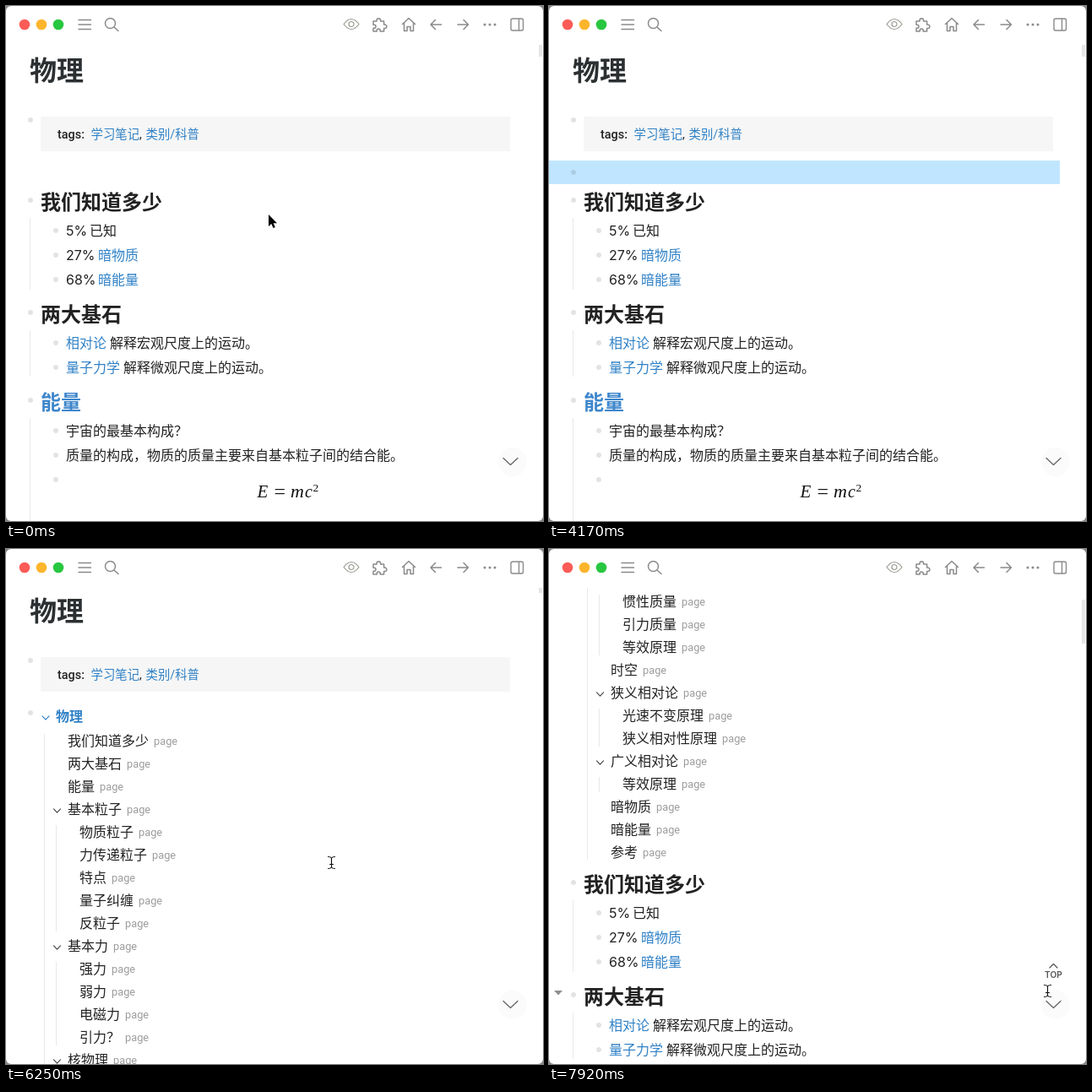
Write an HTML page with a canvas that moves like this. It is 636x610 px and loops after 8000 ms.

```html
<!DOCTYPE html>
<html lang="zh-CN">
<head>
<meta charset="utf-8">
<title>物理</title>
<style>
html, body { margin: 0; width: 100%; height: 100%; overflow: hidden; background: #fff; }
canvas { display: block; }
</style>
</head>
<body>
<canvas id="stage" width="636" height="610"></canvas>
<script>
const ctx = document.getElementById('stage').getContext('2d');
const LOOP = 8000, TICK = 1000 / 12;
const SANS = 'Roboto, "Noto Sans CJK SC", "Noto Sans CJK", sans-serif';
const WIDE = 'Inter, "Noto Sans CJK SC", sans-serif';
const INK = '#222', LINK = '#2f81c6', RULE = '#e8e8e8', ICON = '#8a8a8a';
const BAR = 46, TOC_SHIFT = 873;

// level, label, has children
const toc = [
  [1, '我们知道多少'], [1, '两大基石'], [1, '能量'],
  [1, '基本粒子', 1], [2, '物质粒子'], [2, '力传递粒子'], [2, '特点'], [2, '量子纠缠'], [2, '反粒子'],
  [1, '基本力', 1], [2, '强力'], [2, '弱力'], [2, '电磁力'], [2, '引力？'],
  [1, '核物理', 1], [2, '核辐射'], [2, '核反应', 1], [3, '核裂变'], [3, '核聚变'],
  [1, '质量', 1], [2, '惯性质量'], [2, '引力质量'], [2, '等效原理'], [1, '时空'],
  [1, '狭义相对论', 1], [2, '光速不变原理'], [2, '狭义相对性原理'],
  [1, '广义相对论', 1], [2, '等效原理'], [1, '暗物质'], [1, '暗能量'], [1, '参考']
];

const commands = ['Page reference', 'Page embed', 'Block reference', 'Block embed', 'Link',
  'Image link', 'Underline', 'Code block', 'Today', 'Tomorrow', 'Yesterday'];
const matches = ['Table of Contents', 'Query table function', 'Time stamp', 'Today', 'Template',
  'Tomorrow', 'Current time', 'Date picker', 'Calculator', 'Create table', 'Draw'];
const matchCounts = [11, 6, 3, 2, 2];

// keyed by time in ms
const scrollKeys = [[6170, 0], [6250, 3], [6330, 3], [6420, 72], [6580, 193], [6750, 290], [6920, 371],
  [7170, 478], [7420, 585], [7580, 650], [7670, 690], [7750, 708]];
const pathIn = [[0, 310, 246], [80, 301, 243], [250, 235, 221], [420, 180, 206], [500, 174, 205]];
const pathOut = [[5330, 150, 194], [5580, 150, 193], [5750, 106, 167], [5830, 190, 222], [5920, 320, 325],
  [6000, 385, 371], [7580, 385, 371], [7750, 500, 455], [7840, 575, 512], [7920, 590, 523]];

function track(keys, t) {
  if (t <= keys[0][0]) return keys[0].slice(1);
  const i = keys.findIndex(k => k[0] >= t);
  if (i < 0) return keys[keys.length - 1].slice(1);
  const a = keys[i - 1], b = keys[i], u = (t - a[0]) / (b[0] - a[0]);
  return a.slice(1).map((v, j) => v + (b[j + 1] - v) * u);
}

function rect(x, y, w, h, color) {
  ctx.fillStyle = color;
  ctx.fillRect(x, y, w, h);
}
function dot(x, y, r, color) {
  ctx.fillStyle = color;
  ctx.beginPath();
  ctx.arc(x, y, r, 0, 7);
  ctx.fill();
}
function stroke(d, color, width) {
  ctx.strokeStyle = color;
  ctx.lineWidth = width;
  ctx.lineCap = ctx.lineJoin = 'round';
  ctx.stroke(new Path2D(d));
}
function text(s, x, y, size, color = INK, weight = 400, family = SANS) {
  ctx.font = `${weight} ${size}px ${family}`;
  ctx.fillStyle = color;
  ctx.fillText(s, x, y);
}
// y is the middle of the line
const line = (s, x, y, size = 16, color, weight) => text(s, x, y + size * 0.38, size, color, weight);
const bullet = (x, y) => dot(x, y, 3, 'rgba(0,0,0,.11)');
const guide = (x, top, bottom) => rect(x, top, 1, bottom - top, RULE);
const chevron = (x, y, w, h, color, lw) =>
  stroke(`M${x - w} ${y - h}L${x} ${y + h}L${x + w} ${y - h}`, color, lw);

function item(y, parts) {
  bullet(59, y);
  for (const [s, x, color] of parts) {
    if (s.includes('%')) text(s, x, y + 6, 16, INK, 400, WIDE);
    else line(s, x, y, 16, color);
  }
}
function heading(s, y, color) {
  bullet(29, y - 1.5);
  line(s, 41, y, 24, color, 700);
}

function drawNotes() {
  heading('我们知道多少', 231.5);
  guide(28, 251, 336);
  item(266, [['5%', 71], ['已知', 99]]);
  item(295, [['27%', 71], ['暗物质', 109, LINK]]);
  item(324, [['68%', 71], ['暗能量', 109, LINK]]);
  heading('两大基石', 364.5);
  guide(28, 384, 439);
  item(399, [['相对论', 71, LINK], ['解释宏观尺度上的运动。', 123]]);
  item(428, [['量子力学', 71, LINK], ['解释微观尺度上的运动。', 139]]);
  heading('能量', 468.5, '#3f87cc');
  guide(28, 488, 620);
  item(503, [['宇宙的最基本构成？', 71]]);
  item(532, [['质量的构成，物质的质量主要来自基本粒子间的结合能。', 71]]);
  bullet(59, 561);
  const serif = '"Liberation Serif", serif';
  for (const [s, x, size] of [['E', 297.5, 21], ['m', 337, 22], ['c', 354, 20]])
    text(s, x, 582, size, '#111', 'italic 400', serif);
  text('=', 317.5, 583, 24, '#111', 400, serif);
  text('2', 363.5, 575, 13.5, '#111', 400, serif);
}

function drawToc() {
  bullet(29, 197);
  chevron(47, 203, 4, 2.2, LINK, 1.1);
  line('物理', 59, 201, 16, LINK, 700);
  guide(45, 222, 1076);
  const rowY = i => 230 + i * 27;
  toc.forEach(([level, label, open], i) => {
    const x = 59 + level * 14, y = rowY(i);
    line(label, x, y);
    text('page', x + label.length * 16 + 6, y + 4.5, 12.8, '#9c9c9c');
    if (!open) return;
    chevron(x - 12.5, y + 2, 4, 2.2, '#444', 1.1);
    let last = i + 1;
    while (last + 1 < toc.length && toc[last + 1][0] > level) last++;
    guide(x - 14, rowY(i + 1) - 8, rowY(last) + 10);
  });
}

function drawMenu(items) {
  const h = Math.min(items.length * 36, 367);
  ctx.save();
  ctx.shadowColor = 'rgba(0,0,0,.16)';
  ctx.shadowBlur = 12;
  ctx.shadowOffsetY = 4;
  ctx.fillStyle = '#fff';
  ctx.beginPath();
  ctx.roundRect(47, 211, 300, h, 4);
  ctx.fill();
  ctx.shadowColor = 'transparent';
  ctx.clip();
  rect(47, 211, 300, 36, '#f7f7f7');
  items.forEach((s, i) => text(s, 63, 234 + i * 36, 14, '#2b2b2b'));
  ctx.restore();
}

function drawEditor(t) {
  if (t < 500) return;
  bullet(29, 197);
  if (t >= 4170) return;
  let typed = '', caret = 41;
  if (t >= 2670) {
    typed = '{{renderer :tocgen}}';
    caret = 182;
  } else if (t >= 1170) {
    const n = t < 1750 ? 0 : Math.min(5, Math.round((t - 1750) / TICK) + 1);
    typed = '/table'.slice(0, n + 1);
    ctx.font = '16px ' + SANS;
    caret = n === 5 ? 83 : 41 + Math.round(ctx.measureText(typed).width);
    if (t >= 1420) drawMenu(n ? matches.slice(0, matchCounts[n - 1]) : commands);
  }
  text(typed, 41, 203, 16);
  const blinkOff = (t >= 2420 && t < 2670) || t >= 3420;
  if (!blinkOff) rect(caret, 187, 1, 20, '#111');
}

function drawPage(t, scroll) {
  const hasToc = t >= 4330;
  ctx.save();
  ctx.beginPath();
  ctx.rect(0, BAR, 636, 610 - BAR);
  ctx.clip();
  ctx.translate(0, -scroll);
  line('物理', 28, 76, 32, '#2c3032', 700);
  bullet(29, 135);
  rect(41, 131, 556, 41, '#f6f6f6');
  text('tags:', 61, 157, 14.4, INK, 500);
  line('学习笔记', 100.5, 152, 14.4, LINK);
  text(',', 158, 157, 14.4);
  line('类别/科普', 165.5, 152, 14.4, LINK);
  if (t >= 4170 && t < 5170) rect(0, 183, 605, hasToc ? 900 : 28, '#c0e6ff');
  if (hasToc) {
    drawToc();
    ctx.translate(0, TOC_SHIFT);
  }
  drawNotes();
  if (t >= 7830) {
    ctx.fillStyle = '#8f8f8f';
    ctx.fill(new Path2D('M6 358h10l-5 5.5z'));
  }
  ctx.restore();
  if (!hasToc) drawEditor(t);
}

function drawBar() {
  dot(22, 22, 6.3, '#fc5b57');
  dot(42, 22, 6.3, '#fdb52c');
  dot(62, 22, 6.3, '#28c740');
  stroke('M86 16.5H100.5M86 22H100.5M86 27.5H100.5', ICON, 1.4);
  stroke('M129.5 20.5a6 6 0 1 1-12 0a6 6 0 1 1 12 0M128 25l5 4.5', ICON, 1.5);
  stroke('M400 21.5Q409 9.5 418 21.5Q409 33.5 400 21.5zM412 21.5a3 3 0 1 1-6 0a3 3 0 1 1 6 0', '#9a9a92', 1.2);
  stroke('M435 18h4v-1a2.3 2.3 0 0 1 4.6 0v1h4v4h1a2.3 2.3 0 0 1 0 4.6h-1v3.4h-4.4v-1a2 2 0 0 0-4 0v1h-4.2v-3.8h1a2 2 0 0 0 0-4h-1z', ICON, 1.5);
  stroke('M469.5 21.5l7.5-7 7.5 7M471.5 20v9.5h3.5v-5h4v5h3.5v-9.5', ICON, 1.5);
  stroke('M515.5 22H503M508.5 16.5l-5.5 5.5 5.5 5.5', ICON, 1.5);
  stroke('M535 22h12.5M542 16.5l5.5 5.5-5.5 5.5', ICON, 1.5);
  for (const x of [567, 573, 579]) dot(x, 22, 1.5, ICON);
  stroke('M600 15h10.5a2 2 0 0 1 2 2v10a2 2 0 0 1-2 2h-10.5a2 2 0 0 1-2-2v-10a2 2 0 0 1 2-2zM607.5 15v14', ICON, 1.4);
}

function drawScrollbar(t, scroll) {
  const menuOpen = t >= 1420 && t < 2670;
  const top = scroll * 0.085, bottom = top + (t < 4330 ? 60 : 52);
  const from = menuOpen ? 0 : Math.max(BAR, top);
  rect(631, from, 4, bottom - from, '#e6e6e6');
}

function drawButtons(t) {
  dot(600, 540, 17, '#fbfbfb');
  chevron(597.5, 539.5, 8.5, 4, '#666', 1.3);
  if (t < 7830) return;
  stroke('M593 496l4.5-4.5 4.5 4.5', '#555', 1.3);
  text('TOP', 587, 508, 10.2, '#555', 600, WIDE);
}

function drawPointer(t) {
  if (t >= 1170 && t < 5330) return;
  const [x, y] = track(t < 1170 ? pathIn : pathOut, t);
  ctx.save();
  ctx.translate(Math.round(x), Math.round(y));
  if (t < 330 || (t > 5000 && t < 5750)) {
    const arrow = 'M1 1v14l3.3-3 2.2 5 2.3-1-2.1-4.8h4.3z';
    stroke(arrow, '#fff', 2);
    ctx.fillStyle = '#000';
    ctx.fill(new Path2D(arrow));
  } else {
    const beam = 'M-3.5-6.5q3 0 4 1.5q1-1.5 4-1.5M.5-5v11M-3.5 7.5q3 0 4-1.5q1 1.5 4 1.5M-1.5 2.5h4';
    stroke(beam, '#fff', 3);
    stroke(beam, '#111', 1.2);
  }
  ctx.restore();
}

function draw(now) {
  // twelve steps a second, on times rounded to 10 ms
  const step = Math.min(95, Math.floor((now % LOOP + 5) / TICK));
  const t = Math.round(step * TICK / 10) * 10;
  const scroll = Math.round(track(scrollKeys, t)[0]);
  rect(0, 0, 636, 610, '#858585');
  ctx.save();
  ctx.beginPath();
  ctx.roundRect(0, 0, 636, 610, 6);
  ctx.clip();
  rect(0, 0, 636, 610, '#fff');
  drawPage(t, scroll);
  drawBar();
  drawScrollbar(t, scroll);
  drawButtons(t);
  drawPointer(t);
  ctx.restore();
}

const start = performance.now();
(function loop() {
  draw(performance.now() - start);
  requestAnimationFrame(loop);
})();
</script>
</body>
</html>
```
